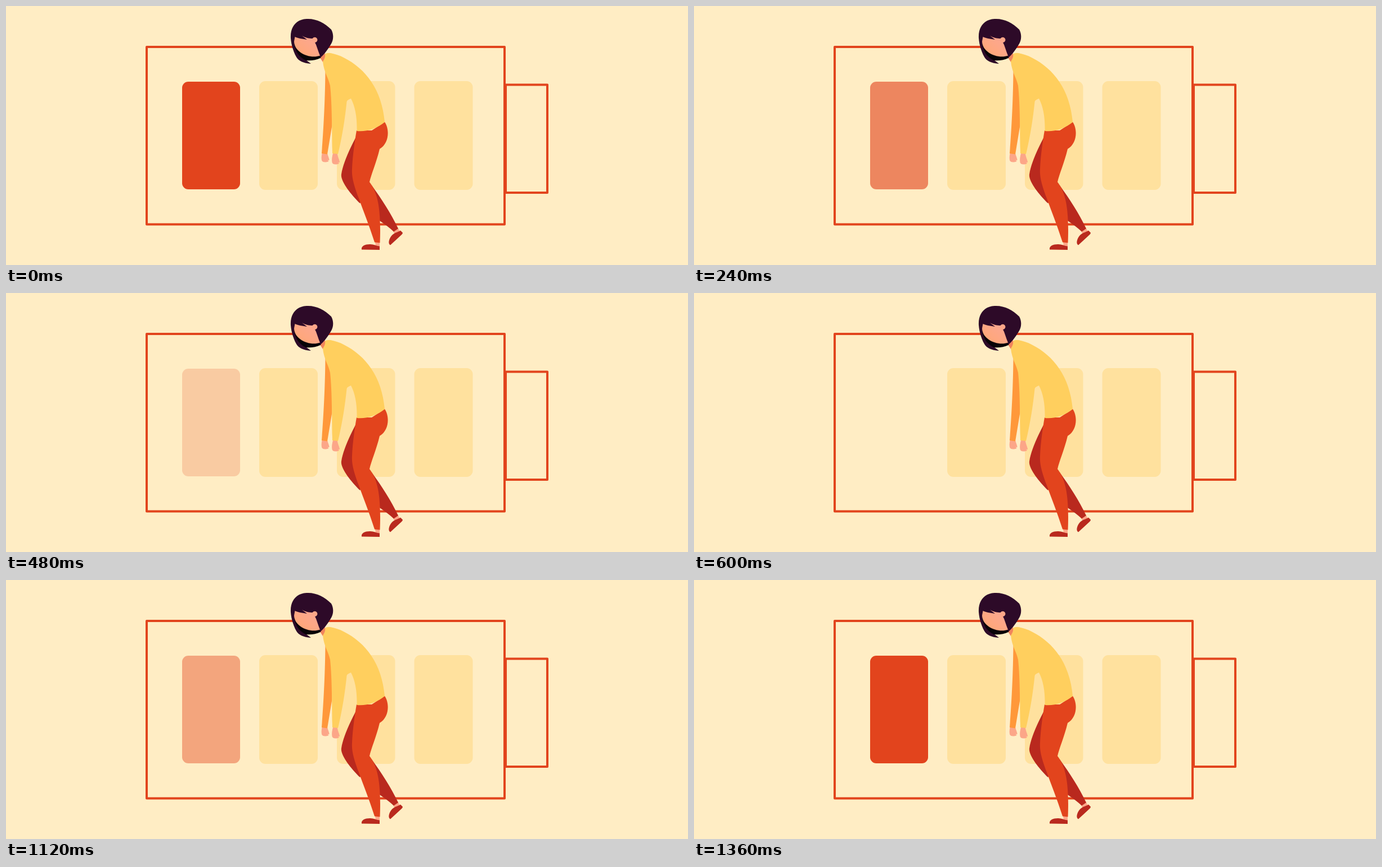
An HTML page that plays this animation: 1212 px wide and 462 px high, repeating every 1.79 s.

```html
<!DOCTYPE html>
<html lang="en">
<head>
<meta charset="utf-8">
<title>Low battery</title>
<style>
html, body { margin: 0; width: 100%; height: 100%; overflow: hidden; background: #ffedc4; }
svg { display: block; width: 100%; height: 100%; }
.case { fill: none; stroke: #e2441d; stroke-width: 4; stroke-linejoin: round; }
.red { fill: #e2441d; }
.dark { fill: #b9291e; }
.empty { fill: #ffe19e; }
.skin { fill: #fca688; }
.hair { fill: #2d0a28; }
.shirt { fill: #ffcf5e; }
.sleeve { fill: #ff983a; }
</style>
</head>
<body>
<svg viewBox="0 0 1212 462">
  <defs>
    <linearGradient id="face" x1="0" y1="1" x2="1" y2="0">
      <stop offset=".2" stop-color="#ffa779"/>
      <stop offset=".8" stop-color="#fca790"/>
    </linearGradient>
    <path id="hand" d="M563 257L570 257C571 266 574 270 574.5 274.5C574 276 572 275 571 274L573.500 277C568 279.500 562 279 561 275C560 270 561 264 563 257Z"/>
  </defs>

  <g class="case">
    <rect x="250" y="73" width="636" height="316.500"/>
    <rect x="888" y="140.500" width="74" height="192.500"/>
  </g>
  <rect id="charge" class="red" x="313" y="135" width="103" height="192" rx="11"/>
  <g class="empty">
    <rect x="450" y="134" width="104" height="194" rx="11"/>
    <rect x="588" y="134" width="103.500" height="194" rx="11"/>
    <rect x="725.500" y="134" width="104" height="194" rx="11"/>
  </g>

  <!-- legs and feet -->
  <path class="skin" d="M687 400L696 395L700 402L691 407ZM656 420H664V430H657Z"/>
  <path class="dark" d="M623 232C612 252 599 280 596 300C594 312 612 335 629 352L650 320C668 345 684 370 697 397L689 402.500C682 396 673 389 664 383L640 300Z"/>
  <path class="dark" d="M632 434.500C631 428 638 425 647 425C654 425 658 428 664 428.500V435Z"/>
  <path class="dark" d="M683 426.500C678 424 681 415 685 410C690 404 696 404 701 400.500L705 404.500Q705 406 703 408Z"/>
  <path class="red" d="M623 222H650L673 207C682 220 681 245 664 255C658 280 649 300 646 314C660 332 667 360 664.500 422.500L655 421.500C645 390 634 363 628 346C618 320 614 305 615 290C616 265 620 240 623 222Z"/>

  <!-- arms and torso -->
  <use href="#hand" class="skin"/>
  <use href="#hand" class="skin" x="18.500" y="4"/>
  <path class="sleeve" d="M567.500 114L579 140L579.500 213L571 264.500L561 263C563 235 567 180 567.500 114Z"/>
  <path fill="#f2855c" d="M558 92L567 84L569 96L563 100Z"/>
  <path class="shirt" d="M567 86Q570 83 577 84C585 86 593 88 600 92C640 112 668 150 673 207C660 218 640 225 623.500 223C624 200 621 180 613 165C609 167 606 168 605.500 171C602 205 597 235 590 264L580 263C579 235 580 180 576 142C573 128 565 118 563 99C566 94 568 90 567 86Z"/>

  <!-- head -->
  <path class="hair" d="M506 57C505 38 515 24 534 23C551 22 566 30 578 42C583 51 582 62 577 69C572 77 566 86 559 92L534 97L542 103C528 102 520 98 516 91C511 82 507 70 506 57Z"/>
  <path fill="#080307" d="M512 67L530 80L557 89L559.500 92.500C550 97 541 98 533 97C520 91 514 80 512 67Z"/>
  <path fill="url(#face)" d="M513.500 55C517 57 527 59 535 60L526 53C532 57 539 58 545 58L549 65C552 70 555 82 558 88.500C540 95 512 83 512 63Z"/>
  <circle class="skin" cx="548.700" cy="60.500" r="4.700"/>
</svg>
<script>
const LOOP = 1790, STEP = 60;
const charge = document.getElementById('charge');

// Fade out in ten steps, pause, then return in seven.
function opacityAt(ms) {
  if (ms < 600) return 1 - Math.floor(ms / STEP) / 10;
  if (ms < 1000) return 0;
  return Math.min(1, (Math.floor((ms - 1000) / STEP) + 1) / 7);
}

function draw() {
  charge.setAttribute('opacity', opacityAt(performance.now() % LOOP));
  requestAnimationFrame(draw);
}
draw();
</script>
</body>
</html>
```
